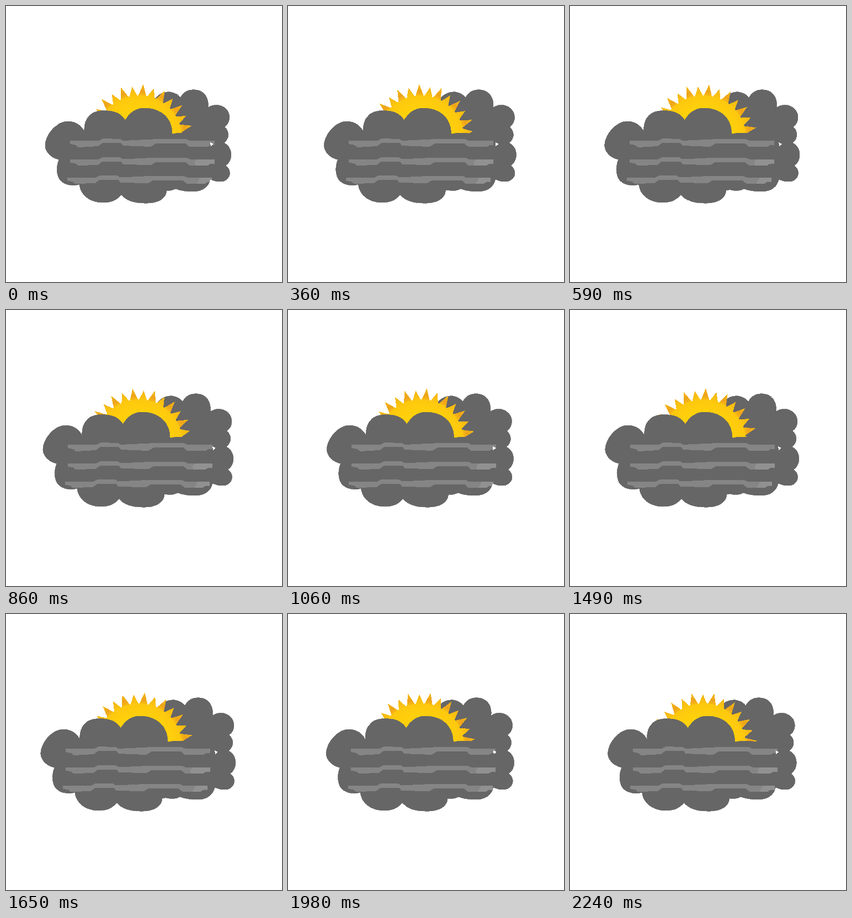
Recreate the animation shown at these times as an HTML page. Size 500x500 px, loop 2.28 s.

```html
<!DOCTYPE html>
<html lang="en">
<head>
<meta charset="utf-8">
<title>Sun behind clouds</title>
<style>
  html, body { margin: 0; width: 100%; height: 100%; overflow: hidden; background: #fff; }
  svg { display: block; width: 100vw; height: 100vh; shape-rendering: crispEdges; }
  .cloud { fill: #666; stroke: #666; stroke-width: .8; }
</style>
</head>
<body>
<svg viewBox="0 0 500 500">
  <defs>
    <radialGradient id="disc" gradientUnits="userSpaceOnUse" cx="0" cy="0" r="79">
      <stop offset=".7" stop-color="#ffd00b"/>
      <stop offset="1" stop-color="#fdc70f"/>
    </radialGradient>
    <radialGradient id="tall" gradientUnits="userSpaceOnUse" cx="0" cy="0" r="98">
      <stop offset=".77" stop-color="#fbc211"/>
      <stop offset=".87" stop-color="#eda31a"/>
      <stop offset="1" stop-color="#f6bb14"/>
    </radialGradient>
    <radialGradient id="short" gradientUnits="userSpaceOnUse" cx="0" cy="0" r="98">
      <stop offset=".77" stop-color="#fdc80f"/>
      <stop offset="1" stop-color="#f0b016"/>
    </radialGradient>
    <path id="bar" fill="#fff" fill-opacity=".2" d="M116 244H168L176 240 207 241 212 244 275 241H326L333 244H378V252H371L366 255H332L325 249H272L262 255 212 253 208 248H175L167 254 131 256 126 252 116 250Z"/>
  </defs>
  <g id="back">
    <path class="cloud" d="M266 176C272 160 286 155 298 156Q310 158 316 166C322 154 333 151 343 152C358 153 368 165 366 184
      C375 178 386 178 394 183C408 191 408 211 396 219C405 227 405 240 395 248
      C411 255 412 280 398 289C410 298 407 315 391 318Q380 319 370 314
      C367 328 356 336 338 336Q320 336 307 331C299 336 286 335 276 331L262 320V200Z"/>
    <path fill="#fff" d="M370 247L376 250 371 254Z"/>
  </g>
  <g id="sun"></g>
  <g id="front">
    <path class="cloud" d="M142 228C141 207 150 192 171 190C190 189 206 191 216 207C222 195 235 185 250 185
      C280 185 301 202 301 232Q322 227 350 234Q362 250 362 275Q362 308 345 322L307 331 291 334
      C290 351 272 358 250 357C232 357 217 352 209 342C199 353 190 356 174 356C152 355 135 343 133 323
      C118 328 99 322 95 310C91 300 92 288 96 278C84 276 71 266 71 252C72 232 92 209 112 209C127 209 138 218 142 228Z"/>
    <use href="#bar"/>
    <use href="#bar" y="33.5"/>
    <use href="#bar" x="-5" y="66.5"/>
    <g fill="#fff" fill-opacity=".1">
      <path d="M347 277.5H378V285.5H371L366 288.5H343L342 283Z"/>
      <path d="M352 310.5H373V318H366L361 321.5H346Z"/>
    </g>
  </g>
</svg>
<script>
const LOOP = 2280;
const CYCLE = 25.8;   // steps in one swing out and back
const SHIFT = 9;
const TURN = 28.5;
const RAYS = 30;

const part = id => document.getElementById(id);
const sun = part('sun'), back = part('back'), front = part('front');

function point(r, deg) {
  const a = deg * Math.PI / 180;
  return `${(r * Math.sin(a)).toFixed(2)} ${(-r * Math.cos(a)).toFixed(2)}`;
}

function buildSun() {
  const gap = 360 / RAYS;
  let shapes = '';
  for (let i = 0; i < RAYS; i++) {
    const a = 4.4 + i * gap, tall = i % 2 === 0;
    shapes += `<path fill="url(#${tall ? 'tall' : 'short'})" d="M${point(76, a - gap / 2)}L${point(tall ? 98.5 : 94.5, a)} ${point(76, a + gap / 2)}Z"/>`;
  }
  sun.innerHTML = shapes + '<circle r="78" fill="url(#disc)"/>';
}

// runs of steps: start, span, count
const runs = [[100, 490, 14], [660, 500, 14], [1190, 490, 13], [1720, 260, 8], [2050, 190, 6]];
const steps = [0];
for (const [start, span, count] of runs)
  for (let i = 0; i < count; i++)
    steps.push(start + Math.round(span * i / (count - 1) / 10) * 10);

// 0 at rest, 1 at the far end, straight in between
const swing = p => 1 - Math.abs(1 - 2 * (p % 1));

function draw(now) {
  const t = now % LOOP;
  const k = swing(steps.findLastIndex(s => s <= t) / CYCLE);
  front.setAttribute('transform', `translate(${-SHIFT * k} 0)`);
  back.setAttribute('transform', `translate(${SHIFT * k} 0)`);
  sun.setAttribute('transform', `translate(241 240) rotate(${TURN * k})`);
}

buildSun();
const begin = performance.now();
function tick() {
  draw(performance.now() - begin);
  requestAnimationFrame(tick);
}
tick();
</script>
</body>
</html>
```
